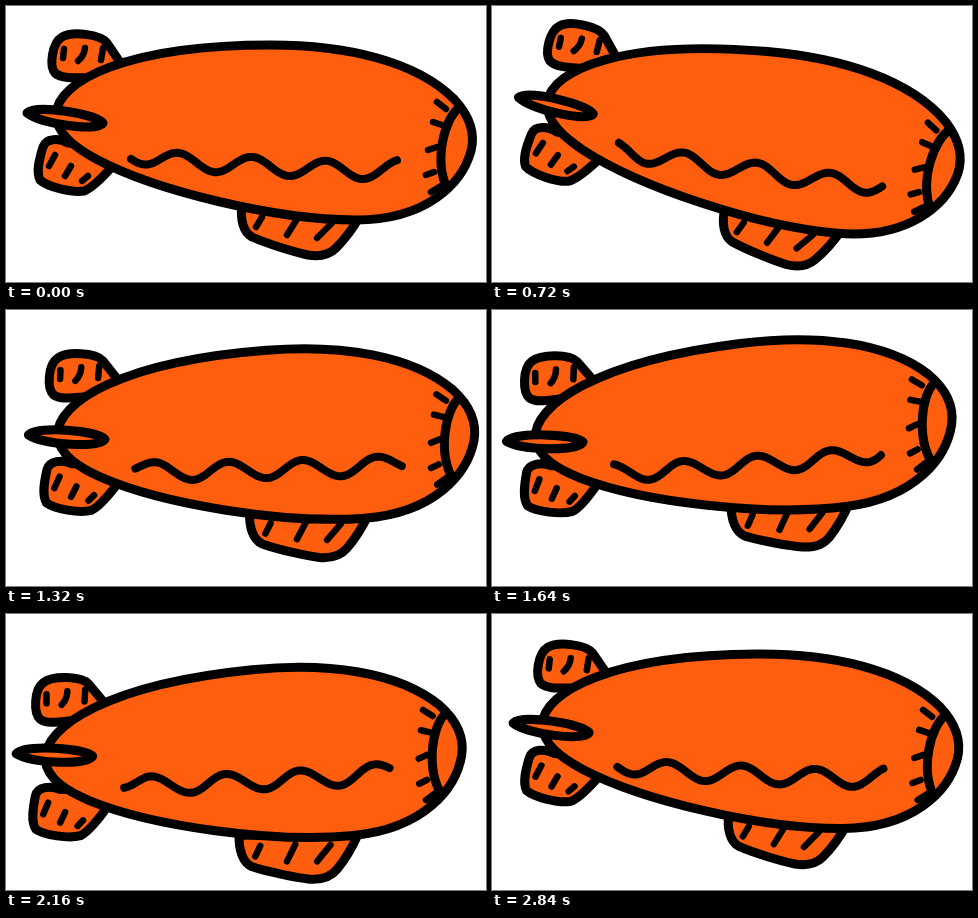
These frames come from a looping animation (480 px wide and 276 px high, 2880 ms). An HTML page with a canvas:

```html
<!DOCTYPE html>
<html lang="en">
<head>
<meta charset="utf-8">
<title>Airship</title>
<style>
html, body { margin: 0; width: 100%; height: 100%; overflow: hidden; background: #fff; }
canvas { display: block; width: 480px; height: 276px; }
</style>
</head>
<body>
<canvas id="stage" width="480" height="276"></canvas>
<script>
const ctx = document.getElementById('stage').getContext('2d');
const ORANGE = '#ff5e0f';
const STEP = 40, STEPS = 72;
const PIVOT = { x: 222, y: 124 };

// Drift of the airship: step, x, y, tilt in degrees
const KEYS = [
  [0, 0, 0, 0], [5, -1, -4.7, 2.3], [10, -1.6, -7.4, 4.8], [14, 0.4, -4.3, 6],
  [20, 4.5, 5.5, 4], [26, 6.3, 8.6, 0.2], [34, 1.3, 3.5, -4.9],
  [41, -6, -0.9, -7.1], [48, -11.8, 9.5, -6.9], [54, -10.2, 20.6, -5.7],
  [58, -5, 22, -4.7], [63, 1.2, 15, -3.1], [67, 1.2, 7.5, -1.7]
];

const shapes = {
  topFin: 'M122 68L101 37C94 28 66 25 56 31C46 37 43 60 49 67C57 74 72 71 90 72L110 85Z',
  lowFin: 'M100 140L62 137C53 132 40 132 37 141C33 154 30 166 34 174C42 181 66 187 78 185C86 182 94 174 104 163Z',
  cabin: 'M236 198C234 213 237 226 246 231C262 238 288 246 302 249C314 251 323 249 330 242C339 233 346 224 354 210Z',
  body: 'M50 108C52 75 120 39 265 39C340 39 410 55 448 93C462 108 470 125 465 145C456 178 420 214 350 214C270 214 150 185 90 153C70 142 50 128 50 108Z',
  wing: 'M21 107C30 98 90 108 97 117C92 126 35 118 21 107Z'
};
const marks = {
  topFin: 'M58 43L57 52M79 42Q78 50 72 55M97 42L95 54',
  lowFin: 'M49 149L43 160M65 160L59 170M82 170L76 175',
  cabin: 'M256 211L250 221M291 213L281 229M326 217L311 232',
  nose: 'M431 96L440 103M427 116L436 119M422 144L431 141M420 169L428 166M425 186L435 180',
  seam: 'M454 101C438 112 428 155 441 182'
};
for (const set of [shapes, marks])
  for (const name in set) set[name] = new Path2D(set[name]);

function keyAt(i) {
  const n = KEYS.length, lap = Math.floor(i / n);
  const [step, ...values] = KEYS[i - lap * n];
  return { step: step + lap * STEPS, values };
}

// Smooth cyclic curve through the keys
function poseAt(step) {
  let i = KEYS.length - 1;
  while (KEYS[i][0] > step) i--;
  const [a, b, c, d] = [-1, 0, 1, 2].map(k => keyAt(i + k));
  const span = c.step - b.step, u = (step - b.step) / span;
  const u2 = u * u, u3 = u2 * u;
  return b.values.map((from, k) => {
    const to = c.values[k];
    const m0 = (to - a.values[k]) / (c.step - a.step) * span;
    const m1 = (d.values[k] - from) / (d.step - b.step) * span;
    return (2 * u3 - 3 * u2 + 1) * from + (u3 - 2 * u2 + u) * m0
      + (3 * u2 - 2 * u3) * to + (u3 - u2) * m1;
  });
}

function line(path, width) {
  ctx.lineWidth = width;
  ctx.stroke(path);
}

function solid(path) {
  ctx.fill(path);
  line(path, 9);
}

// Travelling wave with slightly raised ends
function wave(step) {
  const path = new Path2D(), length = 74, shift = 3 * length * step / STEPS;
  for (let x = 125; x <= 391; x += 2) {
    const size = 8.6 * Math.min(1, 0.75 + (x - 125) / 100);
    const lift = 4.5 * (Math.max(0, Math.abs(x - 258) - 75) / 58) ** 2;
    const mid = 159.5 + 0.052 * (x - 246) - lift;
    path.lineTo(x, mid - size * Math.cos(2 * Math.PI * (x - 172 + shift) / length));
  }
  return path;
}

function draw(step) {
  const [x, y, tilt] = poseAt(step);

  // sag: how much further than the body a part moves vertically
  function part(sag, paint) {
    ctx.save();
    ctx.translate(PIVOT.x + x, PIVOT.y + y * (1 + sag));
    ctx.rotate(tilt * Math.PI / 180);
    ctx.translate(-PIVOT.x, -PIVOT.y);
    paint();
    ctx.restore();
  }
  const attach = (name, sag) => part(sag, () => {
    solid(shapes[name]);
    line(marks[name], 6.5);
  });

  ctx.fillStyle = '#fff';
  ctx.fillRect(0, 0, 480, 276);
  ctx.fillStyle = ORANGE;
  ctx.strokeStyle = '#000';
  ctx.lineCap = ctx.lineJoin = 'round';

  attach('topFin', 0);
  attach('lowFin', 0.1);
  attach('cabin', 0.2);
  part(0, () => {
    solid(shapes.body);
    line(marks.seam, 9);
    line(marks.nose, 6.5);
  });
  part(-0.48, () => line(wave(step), 8));
  part(-0.38, () => solid(shapes.wing));
}

const start = performance.now();
function tick() {
  const time = Math.max(0, performance.now() - start);
  draw(Math.floor(time / STEP) % STEPS);
  requestAnimationFrame(tick);
}
tick();
</script>
</body>
</html>
```
